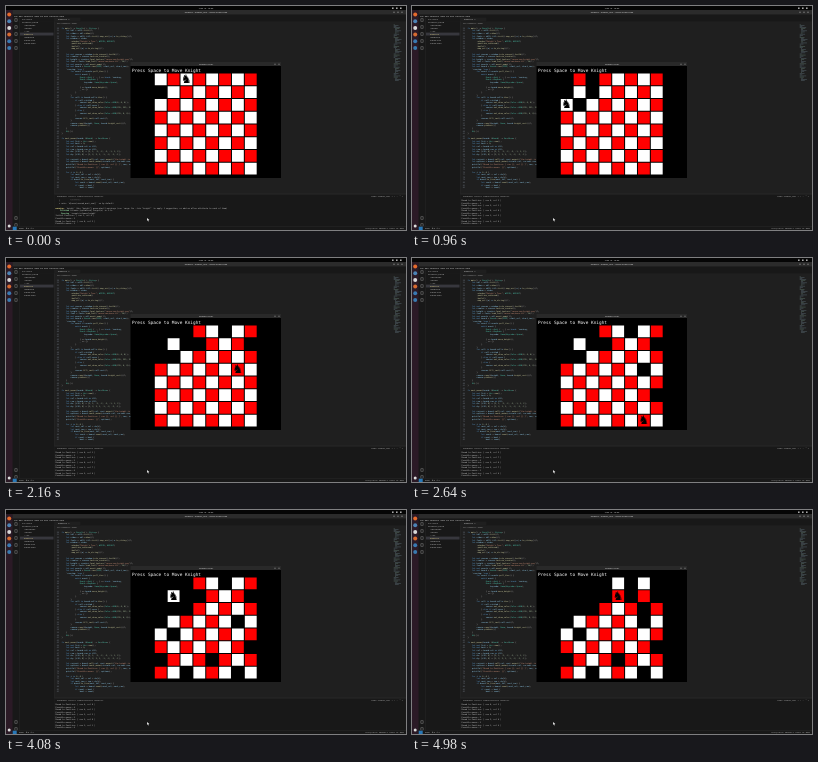
Write an HTML page with a canvas that moves like this. It is 400 by 224 pixels and loops after 5.1 s.

```html
<!DOCTYPE html>
<html lang="en">
<head>
<meta charset="utf-8">
<title>Knight's tour</title>
<style>
html, body { margin: 0; width: 100%; height: 100%; overflow: hidden; background: #000; }
canvas { display: block; width: 400px; height: 224px; }
</style>
</head>
<body>
<canvas id="stage" width="400" height="224"></canvas>
<script>
const LOOP = 5100;
const MONO = '"DejaVu Sans Mono", monospace';
const SANS = '"Noto Sans", "Open Sans", sans-serif';

// [time, column, row]; the first square was left before the loop begins
const MOVES = [
  [-1, 0, 1], [0, 2, 0], [180, 1, 2], [480, 0, 0], [720, 2, 1], [960, 0, 2],
  [1200, 1, 0], [1440, 3, 1], [1680, 5, 0], [1860, 7, 1], [2160, 6, 3],
  [2400, 7, 5], [2640, 6, 7], [2880, 4, 6], [3060, 2, 7], [3300, 0, 6],
  [3480, 1, 4], [3660, 2, 2], [3840, 0, 3], [4080, 1, 1], [4260, 3, 0],
  [4440, 5, 1], [4680, 7, 0], [4800, 6, 2], [4980, 4, 1]
];
const BOARD = { x: 148.3, y: 67, w: 12.86, h: 12.75, gap: 1 };
const TEXT_SIZE = 1.9;
const LINE = 2.57;
const ROWS = 10;

const CODE = `fn main() -> Result<(), String> {
    let sdl = sdl2::init()?;
    let video = sdl.video()?;
    let fonts = sdl2::ttf::init().map_err(|e| e.to_string())?;
    let window = video
        .window("Knight's Tour", WIDTH, HEIGHT)
        .position_centered()
        .build()
        .map_err(|e| e.to_string())?;

    let mut canvas = window.into_canvas().build()?;
    let creator = canvas.texture_creator();
    let knight = creator.load_texture("resources/knight.png")?;
    let font = fonts.load_font("resources/mono.ttf", 24)?;
    let mut events = sdl.event_pump()?;
    let mut board = Board::new(SIZE, start_col, start_row);
    'running: loop {
        for event in events.poll_iter() {
            match event {
                Event::Quit { .. } => break 'running,
                Event::KeyDown {
                    keycode: Some(Keycode::Space),
                    ..
                } => board.move_knight(),
                _ => {}
            }
        }
        for cell in board.cells.iter() {
            if cell.visited {
                canvas.set_draw_color(Color::RGB(0, 0, 0));
            } else if cell.even {
                canvas.set_draw_color(Color::RGB(255, 255, 255));
            } else {
                canvas.set_draw_color(Color::RGB(255, 0, 0));
            }
            canvas.fill_rect(cell.rect)?;
        }
        canvas.copy(&knight, None, board.knight_rect())?;
        canvas.present();
    }
    Ok(())
}

fn next_moves(board: &Board) -> Vec<Move> {
    let mut list = Vec::new();
    let mut best = 9;
    let col = board.col as i32;
    let row = board.row as i32;
    let dx: [i32; 8] = [2, 1, -1, -2, -2, -1, 1, 2];
    let dy: [i32; 8] = [1, 2, 2, 1, -1, -2, -2, -1];

    let current = board.cell(col, row).expect("the knight is outside");
    let options = board.count_moves(current.col, current.row, &dx, &dy);
    println!("Moved to Position: [ row {}, col {} ]", row, col);
    println!("Possible moves: {}", options);

    for i in 0..8 {
        let next_col = col + dx[i];
        let next_row = row + dy[i];
        if board.is_free(next_col, next_row) {
            let count = board.count(next_col, next_row);
            if count < best {
                best = count;`.split('\n');

const START_LOG = [
  '   |         ^^^^^^^^^',
  '   = note: `#[warn(unused_must_use)]` on by default',
  '',
  'warning: `knight` (bin "knight") generated 2 warnings (run `cargo fix --bin "knight"` to apply 1 suggestion, or add an allow attribute to each of them)',
  '    Finished release [optimized] target(s) in 2.1s',
  '     Running `target/release/knight`',
  'Initial Position: [ row 1, col 0 ]',
  'Possible moves: 3'
];

const stage = document.getElementById('stage');
const screen = stage.getContext('2d');
const backdrop = document.createElement('canvas');
backdrop.width = 400;
backdrop.height = 224;
let g = backdrop.getContext('2d');

function box(color, x, y, w, h) {
  g.fillStyle = color;
  g.fillRect(x, y, w, h);
}

function dot(color, x, y, r) {
  g.fillStyle = color;
  g.beginPath();
  g.arc(x, y, r, 0, 7);
  g.fill();
}

function label(color, text, x, y, size, font = SANS, align = 'left') {
  g.fillStyle = color;
  g.font = `${size}px ${font}`;
  g.textAlign = align;
  g.fillText(text, x, y);
}

function tokenColor(token, next) {
  if (/^(impl|for|fn|let|mut|if|else|in|as|match|loop|break)$/.test(token)) return '#5a9fd6';
  if (/^"/.test(token)) return '#ce9178';
  if (/^\d/.test(token)) return '#b5cea8';
  if (/^[A-Z]/.test(token)) return '#4ec9b0';
  if (next === '(') return '#dcdcaa';
  return /^\w/.test(token) ? '#9cdcfe' : '#c0c0c0';
}

function codeLine(line, x, y) {
  g.font = `${TEXT_SIZE}px ${MONO}`;
  const pitch = g.measureText('m').width;
  for (const m of line.matchAll(/"[^"]*"|\w+|[^\s\w]/g)) {
    const next = line[m.index + m[0].length];
    label(tokenColor(m[0], next), m[0], x + m.index * pitch, y, TEXT_SIZE, MONO);
  }
}

function drawDesktop() {
  box('#1f1f1f', 0, 0, 400, 224);
  box('#050505', 0, 0, 400, 4);
  label('#ddd', 'Aug 15  10:53', 200, 3, 2.3, SANS, 'center');
  [386, 390, 394].forEach(x => box('#bbb', x, 1.5, 1.6, 1.4));

  // Dock
  box('#2b1a26', 0, 4, 6.7, 220);
  ['#e66a2c', '#4c83b5', '#d8d8d8', '#d86b30', '#3979b2', '#397bb0']
    .forEach((color, i) => dot(color, 3.2, 8.5 + i * 6.7, 2));
  dot('#ddd', 3.2, 220, 1.5);

  // Editor frame
  box('#2b2b2b', 6.7, 4, 393.3, 4.6);
  box('#181818', 6.7, 8.6, 393.3, 6.8);
  box('#181818', 6.7, 15.4, 41.3, 208.6);
  box('#2b2b2b', 13.5, 11.6, 0.4, 209);
  box('#2b2b2b', 48, 11.6, 0.4, 209);
  box('#1f1f1f', 48.4, 11.6, 26, 3.8);
  label('#ddd', 'knight.rs - knights_tour - Visual Studio Code', 200, 7.2, 2.1, SANS, 'center');
  [388, 392, 396].forEach(x => dot('#888', x, 6.3, 0.7));
  label('#ccc', 'File  Edit  Selection  View  Go  Run  Terminal  Help', 8, 10.9, 2.2);
  label('#ccc', 'knight.rs  ×', 52, 14.2, 2.2);
  label('#999', 'src › knight.rs › main', 51, 17.8, 2.1);

  [14, 21, 28, 35, 42, 212, 219].forEach(y => {
    g.strokeStyle = '#888';
    g.lineWidth = 0.5;
    g.strokeRect(8.9, y - 1.2, 2.2, 2.4);
  });
  label('#999', 'EXPLORER', 16, 14, 2.1);
  box('#37373d', 14, 26.6, 33.5, 2.9);
  ['KNIGHTS_TOUR', '› resources', '› target', '⌄ src', 'knight.rs',
    '.gitignore', 'Cargo.lock', 'Cargo.toml'].forEach((name, i) =>
    label(i === 4 ? '#d8c982' : '#bbb', name, i ? 18 : 16, 17.2 + i * 2.9, 2.2));

  CODE.forEach((line, i) => {
    const y = 22.8 + i * LINE;
    label('#6e7681', 20 + i, 53, y, TEXT_SIZE, MONO, 'right');
    codeLine(line, 55.5, y);
  });

  // Minimap
  for (let i = 0; i < 52; i++) {
    const indent = i % 9 > 3 ? 2 : 0.7;
    box(i % 4 ? '#526069' : '#576d62', 387 + indent, 18 + i * 1.1,
      1 + (i * 7 % 11) * 0.55, 0.5);
  }

  // Terminal and status bar
  box('#181818', 48.4, 188, 351.6, 32.4);
  box('#343434', 48.4, 187.8, 351.6, 0.5);
  label('#aaa', 'PROBLEMS   OUTPUT   DEBUG CONSOLE   TERMINAL', 51, 191, 1.9);
  label('#aaa', 'cargo - knights_tour   +  ⌄  …  ⌃  ×', 397, 191, 2, SANS, 'right');
  box('#181818', 6.7, 220.4, 393.3, 3.6);
  box('#303030', 6.7, 220.4, 393.3, 0.3);
  box('#2878b8', 6.7, 220.7, 4, 3.3);
  label('#bbb', 'main    ⊗ 0  ⚠ 2', 13, 223, 2);
  label('#bbb', 'Ln 63, Col 18   Spaces: 4   UTF-8   LF   Rust', 398, 223, 2, SANS, 'right');

  // Game window
  box('#292929', 124.5, 56, 150.5, 4.5);
  label('#ddd', "Knight's Tour", 200, 59.1, 2.3, SANS, 'center');
  [269, 273].forEach(x => dot('#777', x, 58.2, 0.7));
  box('#000', 124.5, 60, 150.5, 112);
  label('#fff', 'Press Space to Move Knight', 126, 66, 4.42, MONO);
}

function drawTerminal(done) {
  const log = [...START_LOG];
  done.slice(1).forEach(([, col, row], i) => log.push(
    `Moved to Position: [ row ${row}, col ${col} ]`,
    `Possible moves: ${2 + i * 3 % 5}`));
  log.slice(-ROWS).forEach((line, i) => {
    const y = 195 + i * LINE;
    label('#ccc', line, 49.5, y, TEXT_SIZE, MONO);
    const tag = line.match(/^(warning)|^ +(Finished|Running)/);
    if (tag) label(tag[1] ? '#d8c84c' : '#54b967', tag[0], 49.5, y, TEXT_SIZE, MONO);
  });
}

function drawBoard(done) {
  const { x, y, w, h, gap } = BOARD;
  const [, col, row] = done[done.length - 1];
  const left = new Set(done.slice(0, -1).map(([, c, r]) => r * 8 + c));
  for (let i = 0; i < 64; i++) {
    const c = i % 8, r = i >> 3;
    if (left.has(i)) continue;
    box((c + r) % 2 ? '#f00' : '#fff',
      x + c * w + gap / 2, y + r * h + gap / 2, w - gap, h - gap);
  }
  label('#000', '♞', x + (col + 0.5) * w - 0.3, y + (row + 0.5) * h + 3.4, 12,
    '"DejaVu Sans", sans-serif', 'center');
}

function drawPointer() {
  g.fillStyle = '#ddd';
  g.fill(new Path2D('M141 212v3l.8-.7.7 1.2.5-.3-.6-1.1h1z'));
}

drawDesktop();
g = screen;

function frame(now) {
  const done = MOVES.filter(move => move[0] <= now % LOOP);
  g.drawImage(backdrop, 0, 0);
  drawTerminal(done);
  drawBoard(done);
  drawPointer();
  requestAnimationFrame(frame);
}
frame(0);
</script>
</body>
</html>
```
